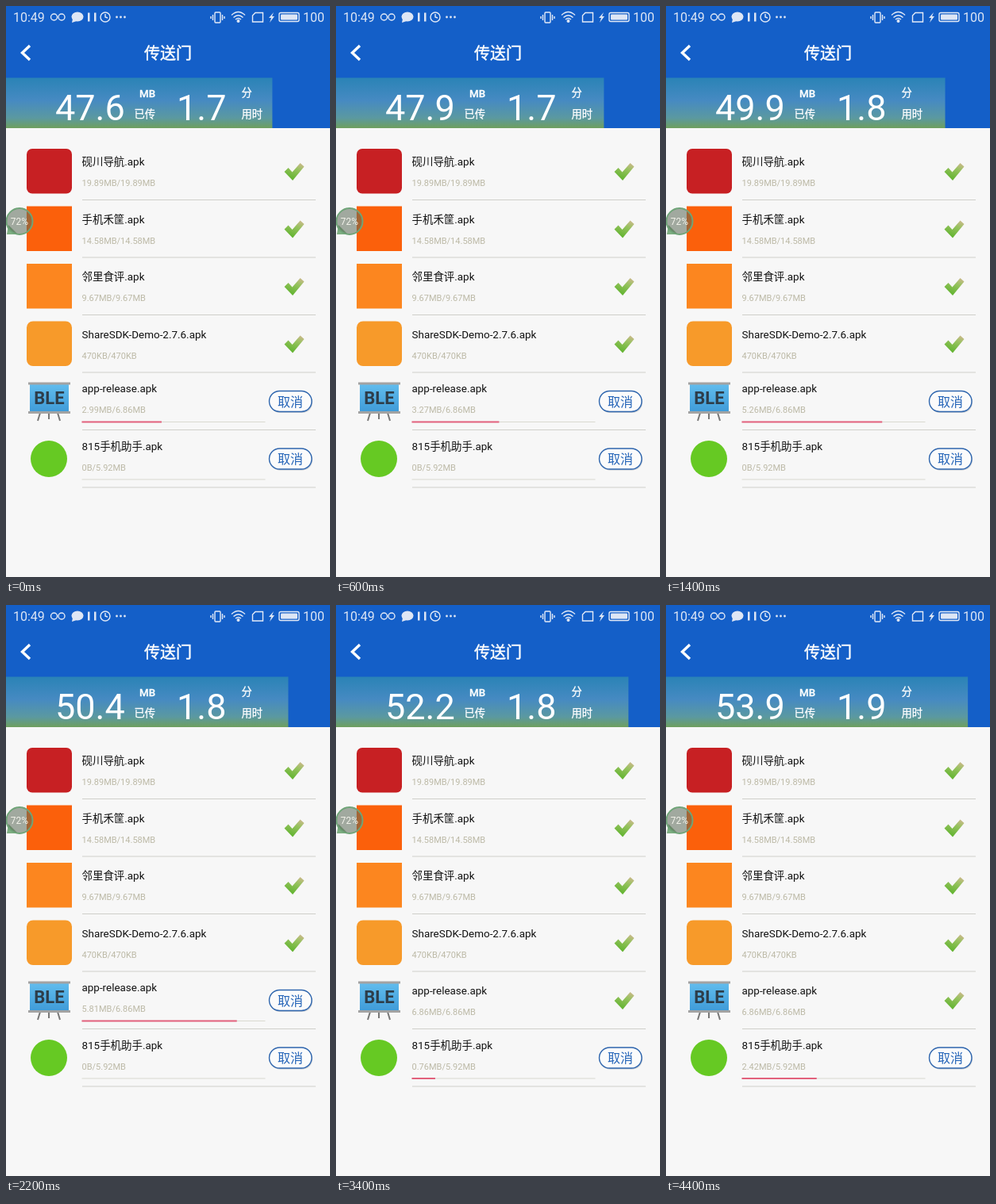
These frames come from a looping animation (408x720 px, 4.6 s). An HTML page:

```html
<!DOCTYPE html>
<html lang="zh-CN">
<head>
<meta charset="utf-8">
<title>传送门</title>
<style>
  html, body { margin: 0; height: 100%; overflow: hidden; background: #f7f7f7; }
  svg { display: block; width: 100vw; height: 100vh; font-family: Roboto, "Noto Sans CJK SC", "Noto Sans CJK", sans-serif; }
  .line { fill: none; stroke: #e4ebf7; stroke-width: 1.4; }
  .pale { fill: #dde6f5; }
  .title { fill: #fff; font-size: 20px; text-anchor: middle; stroke: #fff; stroke-width: .45; }
  .label { fill: #fff; font-size: 13.3px; font-weight: 500; stroke: #fff; stroke-width: .3; }
  .big { fill: #fff; font-size: 45px; }
  .name { font-size: 13.45px; fill: #111; }
  .size { font-size: 11px; fill: #bcb9a6; }
  .cancel text { font-size: 16px; fill: #2464b8; text-anchor: middle; }
</style>
</head>
<body>
<svg viewBox="0 0 408 720" preserveAspectRatio="none">
  <defs>
    <linearGradient id="band" x2="0" y2="1">
      <stop offset="0" stop-color="#2a83b6"/>
      <stop offset=".45" stop-color="#468ac2"/>
      <stop offset=".8" stop-color="#5b99a0"/>
      <stop offset="1" stop-color="#6f9f5e"/>
    </linearGradient>
    <linearGradient id="tickFill" x1=".85" y1="0" x2=".4" y2="1">
      <stop offset="0" stop-color="#cdb98e"/>
      <stop offset=".4" stop-color="#94c25c"/>
      <stop offset="1" stop-color="#5fb32e"/>
    </linearGradient>
    <linearGradient id="board" x2="0" y2="1">
      <stop offset="0" stop-color="#62bdee"/>
      <stop offset="1" stop-color="#3f9bd8"/>
    </linearGradient>
    <path id="tick" d="M350.500 209l5-5 5 5.500 10-11.500 5 4.500-14.500 17.500z" fill="url(#tickFill)"/>
    <g id="easel">
      <path d="M43 223l-3 10M65 223l3 10M54 223v8" stroke="#777" stroke-width="2"/>
      <rect x="30" y="186" width="49" height="36" fill="url(#board)"/>
      <path d="M28 186h53M28 222.500h53" stroke="#a3a3a3" stroke-width="3"/>
      <text x="54.500" y="212" text-anchor="middle" font-size="22" font-weight="700" fill="#2d3d4a">BLE</text>
    </g>
  </defs>

  <rect width="408" height="720" fill="#f7f7f7"/>
  <rect width="408" height="154" fill="#145fc8"/>

  <g class="pale" font-size="16">
    <text x="9" y="19.500">10:49</text>
    <text x="374" y="19.500">100</text>
    <ellipse cx="90" cy="13.500" rx="7.500" ry="6"/>
    <path d="M84 16l-1 5 6-2z"/>
    <path d="M103 8.500h2.500v11h-2.500zM111 8.500h2.500v11h-2.500z"/>
    <circle cx="139.500" cy="14" r="1.400"/>
    <circle cx="144.500" cy="14" r="1.400"/>
    <circle cx="149.500" cy="14" r="1.400"/>
    <path d="M337 8l-6 7h3l-2 6 6-8h-3z"/>
    <rect x="346" y="10.500" width="21" height="7" rx="1"/>
    <circle cx="292.500" cy="19" r="2"/>
  </g>
  <g class="line">
    <circle cx="60.500" cy="14" r="4"/><circle cx="70" cy="14" r="4"/>
    <circle cx="125" cy="14" r="6"/><path d="M125 10v4l3 1"/>
    <rect x="263" y="8" width="7" height="13" rx="1"/>
    <path d="M260.500 11v7M272.500 11v7M258 13v3M275 13v3"/>
    <path d="M284 11.500q8.500-8 17 0M286.500 14.500q6-5.500 12 0M289 17q3.500-3 7 0"/>
    <path d="M314 8.500h9.500v11.500h-13v-8z"/>
    <rect x="344" y="8.500" width="25" height="11" rx="2"/>
  </g>
  <path d="M30 50l-9.500 9 9.500 9" fill="none" stroke="#fff" stroke-width="3.400"/>
  <text class="title" x="204" y="67">传送门</text>

  <rect id="totalBar" y="90.500" height="63.500" fill="url(#band)"/>
  <text id="total" class="big" x="62" y="143.500"></text>
  <text id="minutes" class="big" x="215" y="143.500"></text>
  <g class="label">
    <text x="168" y="114.500">MB</text><text x="161.500" y="141">已传</text>
    <text x="296.500" y="114">分</text><text x="296.500" y="141">用时</text>
  </g>

  <g id="rows"></g>

  <path d="M1 288l2-12 12 12z" fill="#7faf82"/>
  <circle cx="17" cy="271.500" r="16.500" fill="#5b6b58" fill-opacity=".55" stroke="#6fa478" stroke-width="2"/>
  <text x="17" y="276" text-anchor="middle" font-size="12" fill="#f2f2ea">72%</text>
</svg>
<script>
const LOOP = 4600, STEP = 200, ROW = 72.5;
const FINISHED = 44.6, APP_SIZE = 6.86, HELPER_SIZE = 5.92;
const ALL = FINISHED + APP_SIZE + HELPER_SIZE;

// [ms, MB received by the last two files together]
const received = [[0, 2.99], [600, 3.27], [1400, 5.26], [2200, 5.81],
                  [2600, 6.86], [2800, 6.86], [3800, 8.12], [4400, 9.28]];

const square = (color, radius) =>
  `<rect x="26" y="180" width="57" height="56.500" rx="${radius}" fill="${color}"/>`;

const files = [
  ['砚川导航.apk', '19.89MB', square('#c72023', 7)],
  ['手机禾筐.apk', '14.58MB', square('#fb600b', 0)],
  ['邻里食评.apk', '9.67MB', square('#fc861f', 0)],
  ['ShareSDK-Demo-2.7.6.apk', '470KB', square('#f79a2a', 8)],
  ['app-release.apk', '6.86MB', '<use href="#easel"/>'],
  ['815手机助手.apk', '5.92MB', '<circle cx="54" cy="208.500" r="23" fill="#66c923"/>']
];

const $ = id => document.getElementById(id);

$('rows').innerHTML = files.map(([name, size, icon], i) => `
  <g transform="translate(0 ${i * ROW})">
    ${icon}
    <g class="texts">
      <text class="name" x="95.500" y="201">${name}</text>
      <text class="size" x="95.500" y="227">${size}/${size}</text>
    </g>
    <path d="M96 244.500H390" stroke="#cfcfca"/>
    <use class="done" href="#tick"/>
    <g class="cancel" visibility="hidden">
      <path d="M95.500 234.500H326.500" stroke="#d9d9d0"/>
      <rect class="bar" x="95.500" y="233.500" height="2" fill="#e2607c"/>
      <rect x="332" y="197" width="54" height="26" rx="13" fill="#c9ced4"/>
      <rect x="331.500" y="195.500" width="53.500" height="26" rx="13" fill="#fbfbfb" stroke="#2f66ae" stroke-width="1.400"/>
      <text x="358" y="214.500">取消</text>
    </g>
  </g>`).join('');

function amountAt(t) {
  const next = received.findIndex(([time]) => time > t);
  if (next < 0) return received.at(-1)[1];
  const [t0, a] = received[next - 1], [t1, b] = received[next];
  return a + (b - a) * (t - t0) / (t1 - t0);
}

function showFile(index, amount, size) {
  const row = $('rows').children[index], done = amount >= size - 0.001;
  const part = sel => row.querySelector(sel);
  part('.done').setAttribute('visibility', done ? 'visible' : 'hidden');
  part('.cancel').setAttribute('visibility', done ? 'hidden' : 'visible');
  part('.texts').setAttribute('transform', `translate(0 ${done ? 0 : -4})`);
  part('.bar').setAttribute('width', 230.5 * amount / size);
  part('.size').textContent = `${amount < 0.005 ? '0B' : amount.toFixed(2) + 'MB'}/${size}MB`;
}

function draw(now) {
  const t = Math.floor(now % LOOP / STEP) * STEP;
  const amount = amountAt(t), total = FINISHED + amount;
  $('total').textContent = total.toFixed(1);
  $('minutes').textContent = t < 1000 ? '1.7' : t < 4200 ? '1.8' : '1.9';
  $('totalBar').setAttribute('width', 408 * total / ALL - 3);
  showFile(4, Math.min(amount, APP_SIZE), APP_SIZE);
  showFile(5, Math.max(amount - APP_SIZE, 0), HELPER_SIZE);
}

const start = performance.now();
function play() {
  draw(performance.now() - start);
  requestAnimationFrame(play);
}
play();
</script>
</body>
</html>
```
